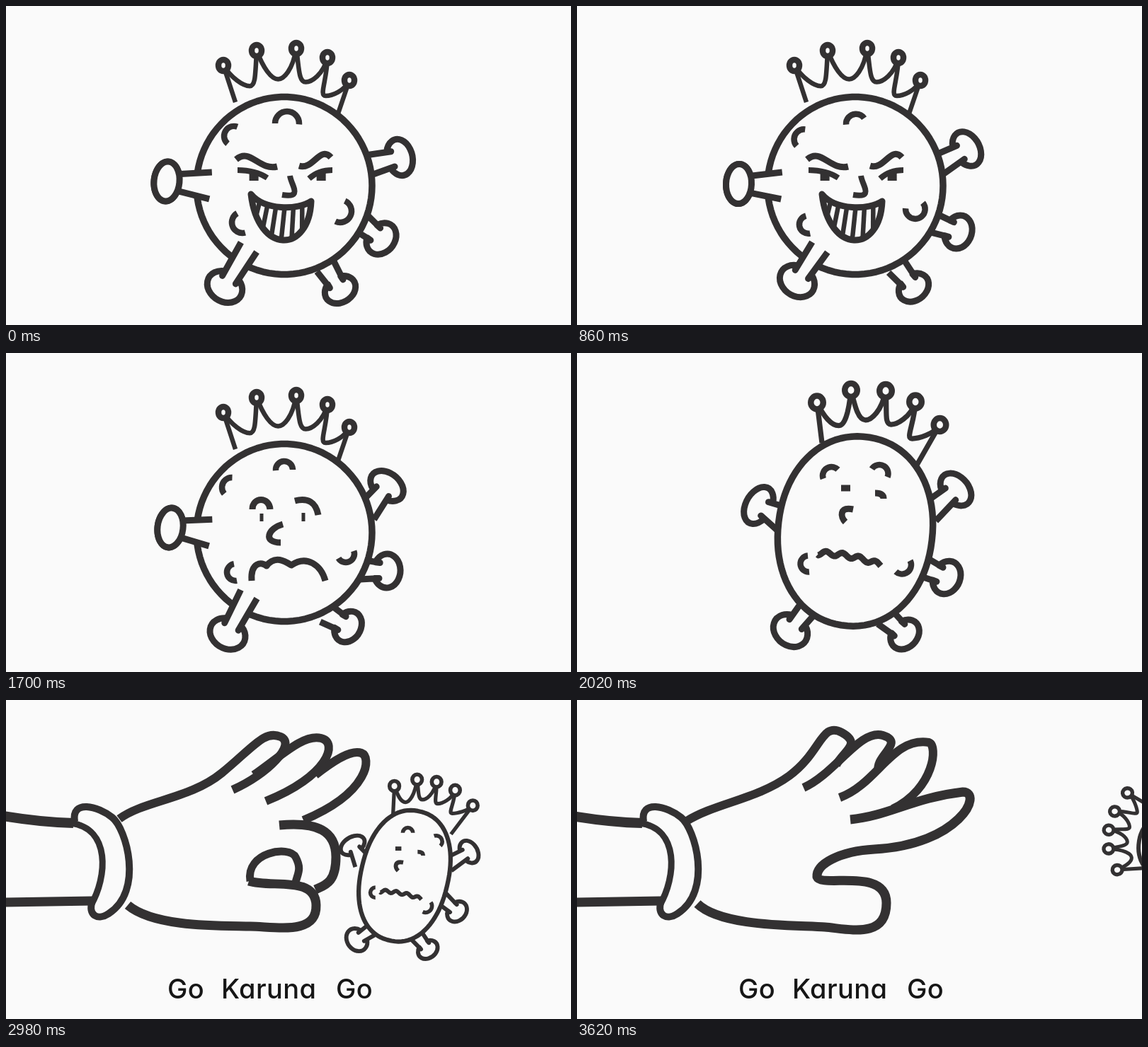
Recreate the animation shown at these times as an HTML page with a canvas. Size 798 by 451 pixels, loop 3.72 s.

```html
<!DOCTYPE html>
<html lang="en">
<head>
<meta charset="utf-8">
<title>Go Karuna Go</title>
<style>
  html, body { margin: 0; width: 100%; height: 100%; overflow: hidden; background: #fafafa; }
  canvas { position: absolute; left: 0; top: 0; }
  .word {
    position: absolute; top: 384px; color: #161616; white-space: pre;
    font: 500 38px/48px Inter, "Noto Sans", sans-serif;
    font-feature-settings: "cv11"; letter-spacing: .4px; visibility: hidden;
  }
</style>
</head>
<body>
<canvas id="stage" width="798" height="451"></canvas>
<div class="word" style="left:228px">Go</div>
<div class="word" style="left:304px">Karuna</div>
<div class="word" style="left:466px">Go</div>
<script>
const INK = '#333132', PAPER = '#fafafa', LOOP = 3720, RAD = Math.PI / 180;
const ctx = document.getElementById('stage').getContext('2d');
const words = [...document.querySelectorAll('.word')];
const wordTimes = [2140, 2460, 2780];

// Redraws come in evenly spaced runs: first, last, count
const runs = [[100, 540, 5], [640, 1060, 5], [1180, 1700, 6],
              [1820, 2340, 6], [2460, 2980, 6], [3200, 3620, 5]];
const ticks = runs.flatMap(([from, to, n]) =>
  Array.from({ length: n }, (_, i) => from + 20 * Math.round((to - from) * i / (n - 1) / 20)));

const clamp = v => Math.max(0, Math.min(1, v));
const ramp = (t, from, to) => clamp((t - from) / (to - from));
const mix = (a, b, k) => a + (b - a) * k;
const blend = (a, b, k) => a.map((v, i) => mix(v, b[i], k));

// Value of a keyed list at time t
function keyed(t, times, keys) {
  let i = 0;
  while (i < times.length - 2 && t >= times[i + 1]) i++;
  return blend(keys[i], keys[i + 1], ramp(t, times[i], times[i + 1]));
}

// Roots are for the round and the egg shape; path holds the bulb centres
const limbTimes = [0, 540, 1180, 1700, 2340];
const limbs = [
  { roots: [[289, 254], [303, 221]], stem: 19, size: [18, 28],
    path: [[227, 248], [226, 242], [231, 261], [232, 247], [281, 184]] },
  { roots: [[508, 226], [486, 226]], stem: 15, size: [18, 26],
    path: [[556, 214], [555, 209], [546, 195], [538, 188], [532, 198]] },
  { roots: [[501, 306], [472, 297]], stem: 14, size: [19, 24],
    path: [[530, 329], [540, 322], [537, 317], [538, 308], [506, 327]] },
  { roots: [[451, 368], [417, 377]], stem: 14, size: [18, 23],
    path: [[472, 401], [468, 405], [483, 391], [483, 387], [443, 409]] },
  { roots: [[343, 341], [321, 367]], stem: 13, size: [21, 26],
    path: [[309, 397], [320, 391], [302, 387], [313, 397], [290, 388]] }
];

// Skin marks are arcs: x, y, radius, from and to in degrees
const markTimes = [0, 1180, 1700, 2340];
const marks = [
  [[322, 184, 14, 130, 290], [320, 190, 14, 140, 272], [319, 190, 14, 140, 272], [400, 157, 11, 180, 360]],
  [[397, 166, 17, 180, 365], [393, 167, 13, 175, 310], [393, 165, 12, 175, 360], [461, 176, 13, 250, 405]],
  [[472, 290, 16, -65, 115], [480, 286, 13, -30, 210], [480, 284, 12, -20, 150], [438, 315, 14, -35, 115]],
  [[334, 306, 15, 75, 240], [324, 310, 12, 80, 260], [324, 310, 12, 80, 260], [330, 286, 11, 90, 270]]
];

// Round and egg versions of the crown tips, followed by its two feet
const crowns = [
  [307, 84, 354, 63, 410, 60, 454, 73, 485, 105, 324, 136, 468, 155],
  [371, 56, 420, 42, 462, 47, 502, 65, 540, 98, 368, 118, 493, 160]
];

const hands = {
  sleeve: [
    [14, 'M-4,164 Q50,173 95,174'], [9, 'M92,174 C148,182 143,250 120,290'], [13, 'M-4,286 L122,284'],
    [10, 'M97,172 C92,140 130,150 150,166 S195,270 145,302 C130,312 115,305 122,284']
  ],
  curled: [
    [12, 'M160,168 C195,142 260,140 305,103 S365,42 388,52 S370,105 320,127'],
    [12, 'M350,106 C390,78 420,48 445,54 S455,108 367,143'],
    [12, 'M437,106 C465,84 488,70 502,75 S515,130 420,170'],
    [13, 'M386,177 C440,172 466,185 466,222 S450,262 437,268'],
    [11, 'M345,256 C338,215 400,205 409,222 S412,245 409,258'],
    [13, 'M343,256 C375,266 437,248 438,290 S385,321 345,320 S210,322 172,290']
  ],
  flicked: [
    [12, 'M155,171 C195,146 255,140 300,107 S345,30 374,46 S376,72 366,92'],
    [12, 'M320,124 C365,104 400,40 432,50 S420,80 426,100'],
    [12, 'M371,138 C425,118 445,52 497,60 C510,64 505,125 446,154'],
    [13, 'M386,169 C440,164 475,138 545,130 C575,130 540,205 420,211 C370,214 338,232 339,250 ' +
         'C345,266 437,236 437,287 S385,324 350,321 S205,322 170,288']
  ]
};

function stroke(width, path, fill) {
  const p = typeof path === 'string' ? new Path2D(path) : path;
  if (fill) ctx.fill(p);
  ctx.lineWidth = width;
  ctx.stroke(p);
}

const sketch = strokes => strokes.forEach(([w, d]) => stroke(w, d));

function brow(x0, y0, x1, y1) {
  stroke(9, `M${x0},${y0} C${mix(x0, x1, .35)},${y0 - 17} ${mix(x0, x1, .55)},${y1 + 6} ${x1},${y1}`);
}

function eye(x0, y0, x1, y1, at, size) {
  stroke(8, `M${x0},${y0} Q${mix(x0, x1, .6)},${y0} ${x1},${y1}`);
  ctx.fillStyle = INK;
  ctx.fillRect(mix(x0, x1, at) - size / 2, y0 + 2, size, size);
  ctx.fillStyle = PAPER;
}

// Lips with evenly spaced dark gaps between the teeth
function teeth(lips, from, to, step, lean) {
  const mouth = new Path2D(lips);
  ctx.save();
  ctx.clip(mouth);
  for (let x = from; x <= to; x += step) stroke(6.5, `M${x},262 L${x + lean(x)},338`);
  ctx.restore();
  stroke(9, mouth);
}

const faces = {
  grin() {
    brow(325, 217, 383, 227);
    brow(459, 214, 414, 226);
    eye(327, 232, 369, 243, .55, 13);
    eye(461, 232, 428, 244, .48, 13);
    stroke(8, 'M401,240 C403,254 420,272 390,267');
    teeth('M346,266 C365,289 412,289 431,276 C428,350 356,352 346,266Z', 362, 425, 11.3, x => (x - 420) * .33);
  },
  sneer() {
    brow(336, 220, 379, 215);
    brow(449, 216, 403, 218);
    eye(350, 229, 370, 239, .22, 10);
    eye(444, 234, 420, 233, .45, 12);
    stroke(9, 'M388,238 C386,254 364,268 395,267');
    teeth('M353,296 C385,305 420,292 449,270 C462,300 440,325 418,318 C400,340 386,326 382,314 C372,316 352,318 353,296Z',
      352, 446, 11.5, () => 18);
  },
  sad() {
    stroke(9, 'M348,221 C348,203 372,203 373,221');
    stroke(9, 'M408,209 Q436,202 441,229');
    stroke(5, 'M361,227 V238 M420,226 V238');
    stroke(9, 'M391,242 C370,248 362,268 388,268');
    stroke(9, 'M347,322 C345,295 362,295 368,301 C380,285 395,295 403,300 C425,285 445,300 451,322');
  },
  dazed() {
    stroke(9, 'M373,191 H386');
    stroke(9, 'M421,198 Q433,198 433,206');
    stroke(9, 'M390,221 C370,217 372,232 379,239');
    let wave = 'M340,285';
    for (let x = 341; x < 430; x += 2)
      wave += ` L${x},${283 + (x - 340) ** 2 * .0021 + 3 * Math.cos((x - 340) * .27)}`;
    stroke(9, wave);
  }
};

function drawLimb(limb, t, egg, sealed) {
  const [x0, y0] = blend(...limb.roots, egg);
  const [x1, y1] = keyed(t, limbTimes, limb.path);
  const [rx, ry] = limb.size, d = Math.hypot(x1 - x0, y1 - y0), neck = 11, gap = 2.65;
  const p = new Path2D();
  p.moveTo(0, -limb.stem);
  p.lineTo(d - rx * .55, -neck);
  p.ellipse(d, 0, rx, ry, 0, -gap, gap);
  p.lineTo(d - rx * .55, neck);
  p.lineTo(0, limb.stem);
  ctx.save();
  ctx.translate(x0, y0);
  ctx.rotate(Math.atan2(y1 - y0, x1 - x0));
  stroke(9, p, true);
  if (sealed) {
    const bulb = new Path2D();
    bulb.ellipse(d, 0, rx, ry, 0, 0, 7);
    stroke(9, bulb, true);
  }
  ctx.restore();
}

// A circle that leans and squares off slightly as it turns into the egg
function drawBody(egg) {
  const [rx, ry, tilt, power] = blend([124, 125.5, 0, 1], [94, 143, 13.3, .9], egg);
  const bend = v => Math.sign(v) * Math.abs(v) ** power;
  const p = new Path2D();
  for (let a = 0; a < 360; a += 4) p.lineTo(rx * bend(Math.cos(a * RAD)), ry * bend(Math.sin(a * RAD)));
  p.closePath();
  ctx.save();
  ctx.translate(393, mix(254, 250, egg));
  ctx.rotate(tilt * RAD);
  stroke(9.5, p, true);
  ctx.restore();
}

// Valleys lie between two tips, pulled towards the middle of the body
function drawCrown(egg) {
  const c = blend(...crowns, egg);
  const points = Array.from({ length: 7 }, (_, i) => c.slice(2 * i, 2 * i + 2));
  const tips = points.slice(0, 5), width = mix(6.5, 8, egg);
  stroke(width, `M${tips[0]} L${points[5]} M${tips[4]} L${points[6]}`);
  for (let i = 0; i < 4; i++) {
    const [ax, ay] = tips[i], [bx, by] = tips[i + 1];
    const mx = (ax + bx) / 2, my = (ay + by) / 2, far = Math.hypot(393 - mx, 252 - my);
    const x = mx + (393 - mx) * 42 / far, y = my + (252 - my) * 42 / far;
    stroke(width, `M${ax},${ay} C${mix(ax, x, .3)},${mix(ay, y, .6)} ${x - 10},${y} ${x},${y}
      C${x + 8},${y} ${mix(bx, x, .2)},${mix(by, y, .7)} ${bx},${by}`);
  }
  for (const [x, y] of tips) {
    const ring = new Path2D();
    ring.ellipse(x, y, mix(7, 10.5, egg), mix(8, 11, egg), 0, 0, 7);
    stroke(8.5, ring, true);
  }
}

function drawVirus(t) {
  const egg = ramp(t, 1700, 2340), round = egg < .5;
  const inFront = i => round && (i === 0 || i === 4);
  limbs.forEach((l, i) => inFront(i) || drawLimb(l, t, egg));
  drawBody(egg);
  limbs.forEach((l, i) => inFront(i) && drawLimb(l, t, egg, i === 0));
  drawCrown(egg);
  for (const m of marks) {
    const [x, y, r, from, to] = keyed(t, markTimes, m), arc = new Path2D();
    arc.arc(x, y, r, from * RAD, to * RAD);
    stroke(8.5, arc);
  }
  faces[t < 960 ? 'grin' : t < 1500 ? 'sneer' : round ? 'sad' : 'dazed']();
}

function drawHand(slide, open) {
  ctx.save();
  ctx.translate(mix(-540, 0, slide), 0);
  sketch(hands[open ? 'flicked' : 'curled']);
  if (open) ctx.translate(-3, 0);
  sketch(hands.sleeve);
  ctx.restore();
}

function draw(t) {
  ctx.fillStyle = PAPER;
  ctx.strokeStyle = INK;
  ctx.lineJoin = 'round';
  ctx.fillRect(0, 0, 798, 451);

  const slide = ramp(t, 2460, 2980), fly = ramp(t, 3100, 3620);
  const scale = mix(1, .655, slide) - .025 * fly;
  ctx.save();
  ctx.translate(mix(393, 563, slide) + 320 * fly, mix(250, 248.7, slide) - 36 * fly);
  ctx.rotate(-96.4 * RAD * fly);
  ctx.scale(scale, scale);
  ctx.translate(-393, -250);
  drawVirus(t);
  ctx.restore();

  if (slide > 0) drawHand(slide, t >= 3200);
  words.forEach((w, i) => w.style.visibility = t >= wordTimes[i] ? 'visible' : 'hidden');
}

let start, shown;
function loop(now) {
  start ??= now;
  const t = (now - start) % LOOP;
  const tick = ticks.filter(v => v <= t).pop() ?? 0;
  if (tick !== shown) draw(shown = tick);
  requestAnimationFrame(loop);
}
draw(0);
requestAnimationFrame(loop);
</script>
</body>
</html>
```
